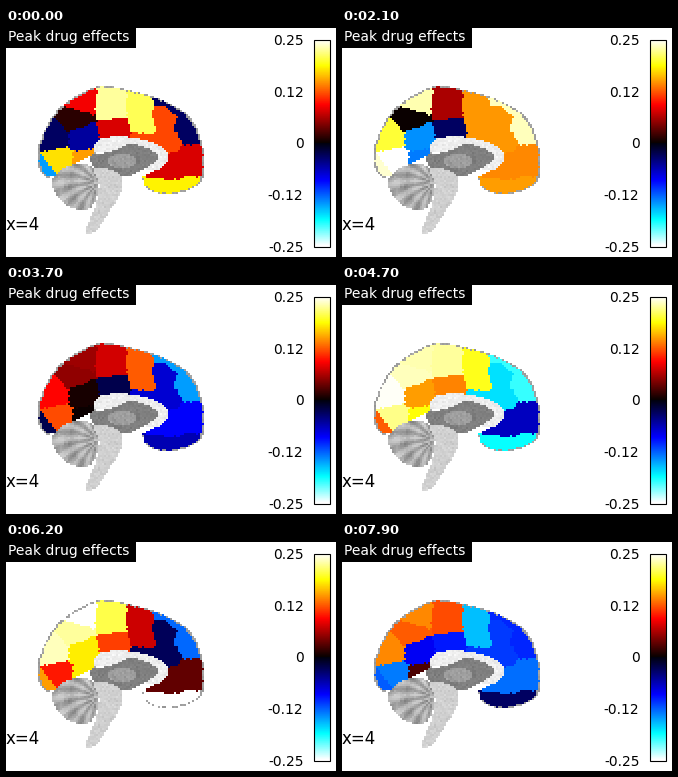
Recreate the animation shown at these times as a matplotlib script. Size 330 by 229 pixels, loop 8000 ms.

```python
import numpy as np
import matplotlib.pyplot as plt
from matplotlib.animation import FuncAnimation
from matplotlib.patches import Rectangle
from matplotlib.path import Path

W, H, CELL = 330, 229, 2
FRAMES, STEP = 80, 100
rng = np.random.default_rng(4)

# Control points of smooth closed outlines
HEAD = [(31, 130), (38, 104), (55, 79), (90, 59), (122, 62), (158, 73),
        (186, 92), (198, 127), (194, 155), (165, 166), (143, 161),
        (137, 149), (150, 139), (120, 118), (88, 126), (60, 141), (40, 149)]
CALLOSUM = [(88, 122), (97, 110), (130, 110), (157, 120), (162, 132),
            (148, 143), (125, 134), (102, 126)]
VENTRICLE = [(84, 128), (104, 124), (128, 116), (152, 128), (136, 142),
             (118, 148), (92, 142)]
CEREBELLUM = [(46, 154), (62, 138), (84, 138), (93, 156), (84, 180), (60, 177)]
STEM = [(88, 140), (112, 145), (116, 162), (103, 184), (90, 203), (80, 203),
        (90, 176), (93, 156)]

# Each parcel is the area nearest to its seeds
SEEDS = {
    "pole": [(36, 144)],
    "calcarine": [(52, 132)],
    "cuneus": [(47, 110)],
    "parietal": [(70, 90)],
    "precuneus": [(78, 109)],
    "postcentral": [(74, 75)],
    "paracentral": [(106, 78)],
    "motor": [(136, 78), (139, 97)],
    "midcingulate": [(108, 104)],
    "cingulate": [(157, 90), (160, 112), (138, 115)],
    "frontal": [(156, 66), (168, 74), (182, 100)],
    "ventral": [(184, 133), (164, 140)],
    "orbital": [(183, 163), (162, 162)],
    "retrosplenial": [(80, 135)],
}

# Effect at the key times, in percent of the colour limit
KEY_MS = [0, 800, 2100, 3700, 4700, 6200, 7900]
TRACKS = {
    "pole": [-60, 31, 95, -10, 50, 60, -50],
    "calcarine": [70, 100, 100, 48, 88, 40, -55],
    "cuneus": [-13, 48, 80, 37, 99, 93, 57],
    "parietal": [5, 62, 0, 20, 93, 90, 50],
    "precuneus": [-22, -24, -58, 2, 60, 72, -35],
    "postcentral": [35, 87, 92, 22, 92, 100, 57],
    "paracentral": [90, 74, 24, 30, 90, 82, 48],
    "motor": [83, 70, 59, 50, 77, 29, -65],
    "midcingulate": [31, 35, -13, -10, 56, 46, -40],
    "cingulate": [47, 64, 59, -30, -70, -12, -45],
    "frontal": [-13, 26, 93, -60, -80, -52, -42],
    "ventral": [31, 48, 57, -36, -27, 13, -53],
    "orbital": [73, 65, 60, -25, -75, 100, -13],
    "retrosplenial": [60, 80, -55, 0, 75, 72, 10],
}

ny, nx = -(-H // CELL), W // CELL
yy, xx = np.mgrid[0:ny, 0:nx] * CELL + CELL / 2
pts = np.stack([xx, yy], axis=-1)


def smooth(points, n=8):
    """Closed Catmull-Rom curve through the points."""
    b = np.array(points, float)
    a, c, d = np.roll(b, 1, 0), np.roll(b, -1, 0), np.roll(b, -2, 0)
    t = np.linspace(0, 1, n, endpoint=False)[None, :, None]
    a, b, c, d = (p[:, None] for p in (a, b, c, d))
    curve = b + t / 2 * (c - a + t * (2 * a - 5 * b + 4 * c - d
                                      + t * (3 * (b - c) + d - a)))
    return curve.reshape(-1, 2)


def inside(outline, p=pts):
    return Path(smooth(outline)).contains_points(p.reshape(-1, 2)).reshape(ny, nx)


def ellipse(x, y, a, b):
    return ((xx - x) / a) ** 2 + ((yy - y) / b) ** 2 < 1


def cold_hot(v):
    """Hot for positive values, hot with red and blue swapped for negative."""
    v = np.asarray(v, float)
    rgb = plt.get_cmap("hot")(np.abs(v))[..., :3]
    return np.where(v[..., None] < 0, rgb[..., ::-1], rgb)


def anatomy():
    angle = np.arctan2(yy - 156, xx - 92)
    radius = np.hypot(xx - 92, yy - 156)
    folia = 172 + 24 * np.sin(15 * angle + radius / 9) + 10 * np.cos(radius / 3)
    layers = [(inside(HEAD), 160), (inside(CALLOSUM), 238),
              (inside(VENTRICLE), 128), (ellipse(116, 133, 14, 7), 158),
              (inside(CEREBELLUM), folia), (inside(STEM), 208)]
    gray = np.full((ny, nx), 255.0)
    noise = rng.normal(0, 5, (ny, nx))
    for mask, tone in layers:
        gray = np.where(mask, tone + noise, gray)
    return np.repeat(np.clip(gray / 255, 0, 1)[..., None], 3, axis=-1)


def parcel_map():
    rough = pts + rng.uniform(-1, 1, pts.shape)
    dist = [np.min([np.hypot(*(rough - s).transpose(2, 0, 1)) for s in seeds],
                   axis=0) for seeds in SEEDS.values()]
    labels = np.argmin(dist, axis=0)
    # Leave a patchy gray rim around the coloured cortex
    mid = np.array([118, 118])
    rim = mid + (pts - mid) * 1.022 + rng.uniform(-0.8, 0.8, pts.shape)
    cortex = inside(HEAD) & inside(HEAD, rim)
    for part in (CALLOSUM, VENTRICLE, CEREBELLUM):
        cortex &= ~inside(part)
    return labels, cortex


base = anatomy()
labels, cortex = parcel_map()


def brain(ms):
    effect = np.array([np.interp(ms, KEY_MS, TRACKS[k]) for k in SEEDS]) / 100
    img = base.copy()
    img[cortex] = cold_hot(effect)[labels[cortex]]
    return img


fig = plt.figure(figsize=(W / 100, H / 100), dpi=100, facecolor="white")
ax = fig.add_axes([0, 0, 1, 1])
ax.axis("off")

slice_img = ax.imshow(brain(0), extent=(0, nx * CELL, ny * CELL, 0),
                      interpolation="nearest", aspect="auto")
ramp = cold_hot(np.linspace(1, -1, 207))[:, None]
ax.imshow(ramp, extent=(307.5, 323.5, 218.5, 11.5), interpolation="nearest",
          aspect="auto")
ax.add_patch(Rectangle((307.5, 11.5), 16, 207, fill=False, ec="black", lw=0.8))
ax.set_xlim(0, W)
ax.set_ylim(H, 0)

for i, label in enumerate(["0.25", "0.12", "0", "-0.12", "-0.25"]):
    ax.text(297.5, 11.5 + i * 207 / 4, label, size=10, ha="right",
            va="center_baseline")

ax.add_patch(Rectangle((0, 0), 129.5, 19.5, fc="black", ec="none"))
ax.text(2, 13.5, "Peak drug effects", size=10, color="white", va="baseline")
ax.text(-0.5, 202, "x=4", size=12, va="baseline")


def update(i):
    slice_img.set_data(brain(i * STEP))
    return [slice_img]


anim = FuncAnimation(fig, update, frames=FRAMES, interval=STEP, repeat=True,
                     repeat_delay=0)
plt.show()
```
